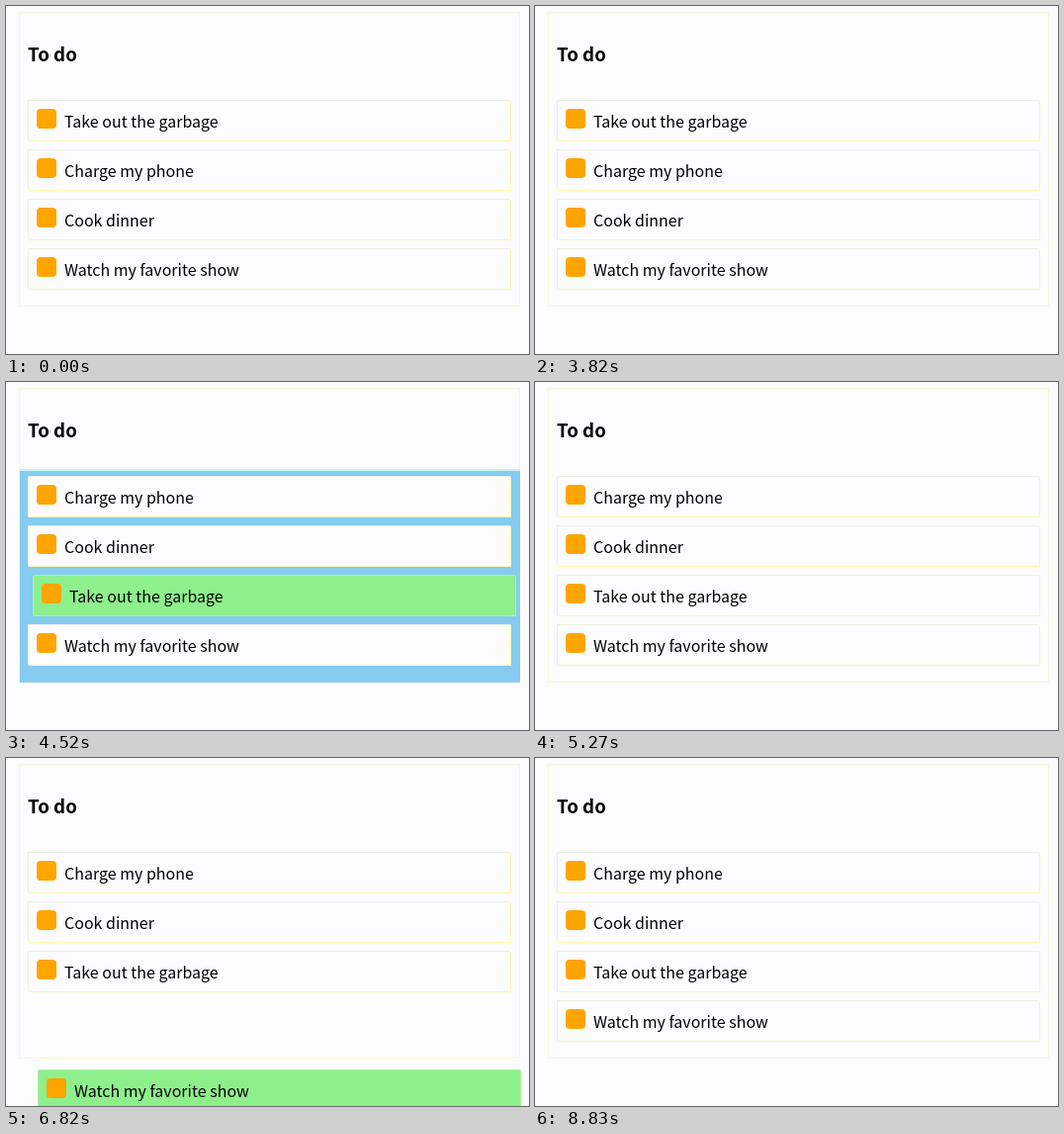
Write an HTML page that moves like this. It is 529 by 352 pixels and loops after 9.79 s.

```html
<!DOCTYPE html>
<html lang="en">
<head>
<meta charset="utf-8">
<title>To do</title>
<style>
  html, body { margin: 0; width: 100%; height: 100%; overflow: hidden; background: #fcfcfe; }
  svg { display: block; width: 100vw; height: 100vh; }
  text { font: 16px "Noto Sans CJK JP", "Noto Sans CJK SC", "Noto Sans CJK", "Open Sans", sans-serif; fill: #000; }
  .title { font-size: 18.72px; font-weight: 700; }
  .line { fill: none; stroke-width: 1; }
</style>
</head>
<body>
<svg id="stage" viewBox="0 0 529 352" xmlns="http://www.w3.org/2000/svg">
  <rect width="529" height="352" fill="#fcfcfe"/>
  <rect class="line" x="13.5" y="6.5" width="506" height="297" stroke="#f7f7e0"/>
  <g id="list">
    <rect x="14" y="88" width="506" height="2" fill="#c4f4f6"/>
    <rect x="14" y="90" width="506" height="214" fill="#86cbf0"/>
  </g>
  <text class="title" x="22" y="56">To do</text>
</svg>
<script>
const LOOP = 9790, LEFT = 22, TOP = 95, PITCH = 50;
const WHITE = '#fcfcfe', GREEN = '#8ef08c';
const stage = document.getElementById('stage');
const list = document.getElementById('list');

const smooth = p => p * p * (3 - 2 * p);
const settle = p => 1 - (1 - p) ** 4;
const ramp = (t, at, span, ease = smooth) =>
  ease(Math.min(1, Math.max(0, (t - at) / span)));
const fade = (t, on, off) => ramp(t, on, 200) - ramp(t, off, 200);

// Neighbours slide up one row as the dragged card passes them.
const makeRoom = at => t => [0, -PITCH * ramp(t, at, 200, settle)];

function dragTwoRows(t) {
  const out = ramp(t, 3880, 620);
  const free = 1 - ramp(t, 4820, 250, settle);
  return [(5 * out + 4 * Math.sin(Math.PI * out)) * free, 2 * PITCH * out];
}

function dragOffList(t) {
  const out = ramp(t, 5730, 890);
  const back = ramp(t, 7270, 330);
  const dip = ramp(t, 7820, 160);
  const free = 1 - ramp(t, 8000, 230, settle);
  return [(10 * out * out - 7 * back + 8 * dip) * free,
          (70 * out - 49 * back + 25 * dip) * free];
}

// Later cards are painted on top.
const tasks = [
  { label: 'Charge my phone', row: 1, move: makeRoom(4085) },
  { label: 'Cook dinner', row: 2, move: makeRoom(4315) },
  { label: 'Take out the garbage', row: 0, move: dragTwoRows, held: t => t >= 3880 && t < 5070 },
  { label: 'Watch my favorite show', row: 3, move: dragOffList, held: t => t >= 5700 && t < 8230 }
];

function add(parent, tag, attrs, text = '') {
  const el = document.createElementNS('http://www.w3.org/2000/svg', tag);
  for (const key in attrs) el.setAttribute(key, attrs[key]);
  el.textContent = text;
  return parent.appendChild(el);
}

for (const task of tasks) {
  const g = task.g = add(stage, 'g', {});
  task.card = add(g, 'rect', { width: 489, height: 42, rx: 2 });
  task.edge = add(g, 'g', { class: 'line' });
  add(task.edge, 'path', { d: 'M.5 41V.5H488', stroke: '#eef1e2' });
  add(task.edge, 'path', { d: 'M1 41.5H488.5V1', stroke: '#fafaad' });
  add(g, 'rect', { x: 9, y: 9, width: 20, height: 20, rx: 4, fill: '#ffa500' });
  add(g, 'text', { x: 37, y: 28 }, task.label);
}

function draw(t) {
  // The list is tinted only while a card is held over it.
  list.setAttribute('opacity',
    fade(t, 3880, 5070) + fade(t, 5700, 6380) + fade(t, 7370, 8230));
  for (const { g, card, edge, row, move, held } of tasks) {
    const [dx, dy] = move(t);
    const active = held && held(t);
    g.setAttribute('transform', `translate(${LEFT + dx} ${TOP + row * PITCH + dy})`);
    card.setAttribute('fill', active ? GREEN : WHITE);
    edge.setAttribute('opacity', active ? 0.3 : 1);
  }
}

const start = performance.now();
function tick() {
  draw((performance.now() - start) % LOOP);
  requestAnimationFrame(tick);
}
tick();
</script>
</body>
</html>
```
